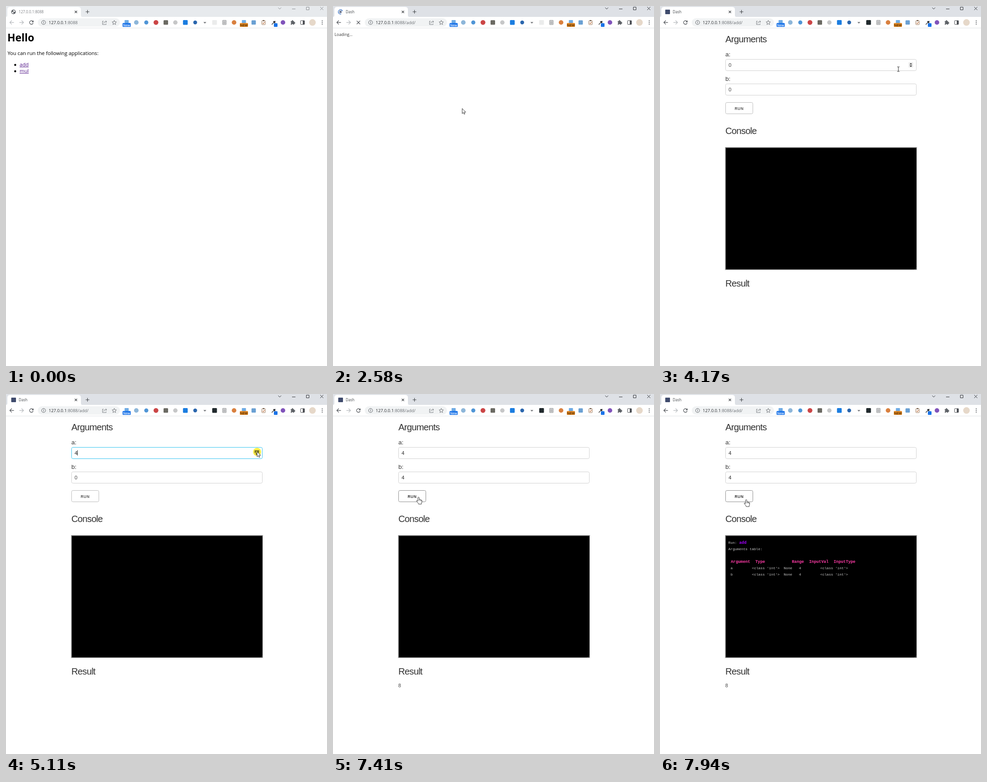
These frames come from a looping animation (707 px wide and 793 px high, 8 s). An HTML page with a canvas:

```html
<!DOCTYPE html>
<html lang="en">
<head>
<meta charset="utf-8">
<title>Dash form</title>
<style>
html, body { margin: 0; width: 100%; height: 100%; overflow: hidden; background: #fff; }
canvas { display: block; }
</style>
</head>
<body>
<canvas id="stage" width="707" height="793"></canvas>
<script>
const ctx = document.getElementById('stage').getContext('2d');
const LOOP = 8000;
const UI = '"Open Sans", "Noto Sans", sans-serif';
const ARIAL = '"Liberation Sans", Arial, sans-serif';
const MONO = '"Liberation Mono", monospace';

const T = {
  status: 980, click: 1150, wait: 1250, commit: 1990, loading: 2180, form: 2710,
  ready: 3700, console: 3640, focusB: 6040, run: 7200, result: 7410,
  updating: 7480, output: 7540, done: 7600
};
const clicksA = [4440, 4640, 4840, 5040];
const clicksB = [T.focusB, 6310, 6500, 6700];
const clicks = [T.click, ...clicksA, ...clicksB, T.run];

// time, x, y of the pointer hotspot
const path = [
  [40, 678, 800], [840, 49, 128.5], [1850, 49, 128.5], [2600, 285, 226],
  [2710, 285, 226], [3450, 190, 207], [3560, 190, 207], [4170, 525, 139],
  [4310, 553, 127], [5200, 553, 127], [5520, 554, 164], [5680, 554, 164],
  [5780, 557, 180], [6760, 557, 180], [6930, 300, 240], [7070, 188.5, 227],
  [7440, 188.5, 227], [7500, 189, 230.5], [7810, 189, 230.5], [7900, 190, 232.5]
];

const arrow = new Path2D('M0 0V11.2L2.6 8.8 4.3 12.6 6.1 11.8 4.4 8.1H7.9Z');
const hand = new Path2D('M-1.6 1.2Q0-1 1.4 1.2V5.4Q3 4.4 4 5.9 5.4 5.3 6 6.8 7.7 6.6 7.6 8.5' +
  'L7 12Q6.4 13 6.3 15.5H-.2Q-.5 13.5-2 12L-4.6 8.6Q-4.4 6.8-2.8 7.8L-1.6 9Z');

function text(str, x, y, size, color, family = UI, weight = 400, spacing = 0) {
  ctx.font = `${weight} ${size}px ${family}`;
  ctx.letterSpacing = spacing + 'px';
  ctx.fillStyle = color;
  ctx.fillText(str, x, y);
  return ctx.measureText(str).width;
}

function box(x, y, w, h, fill, r = 0, stroke) {
  ctx.beginPath();
  ctx.roundRect(x, y, w, h, r);
  if (fill) { ctx.fillStyle = fill; ctx.fill(); }
  if (stroke) { ctx.strokeStyle = stroke; ctx.lineWidth = 1; ctx.stroke(); }
}

function disc(x, y, r, fill) {
  ctx.beginPath();
  ctx.arc(x, y, r, 0, 7);
  ctx.fillStyle = fill;
  ctx.fill();
}

function line(d, color, width = 1) {
  ctx.strokeStyle = color;
  ctx.lineWidth = width;
  ctx.stroke(new Path2D(d));
}

function shape(d, fill) {
  ctx.fillStyle = fill;
  ctx.fill(new Path2D(d));
}

function cross(x, y, r, color, width) {
  line(`M${x - r} ${y - r}l${2 * r} ${2 * r}m0 ${-2 * r}l${-2 * r} ${2 * r}`, color, width);
}

function arc(x, y, r, from, to, color, width) {
  ctx.beginPath();
  ctx.arc(x, y, r, from, to);
  ctx.strokeStyle = color;
  ctx.lineWidth = width;
  ctx.stroke();
}

function pointerAt(t) {
  let i = 1;
  while (i < path.length - 1 && path[i][0] < t) i++;
  const [t0, x0, y0] = path[i - 1], [t1, x1, y1] = path[i];
  const k = Math.min(1, Math.max(0, (t - t0) / (t1 - t0)));
  const e = k * k * (3 - 2 * k);
  return { x: x0 + (x1 - x0) * e, y: y0 + (y1 - y0) * e };
}

const inside = (p, x, y, w, h) => p.x >= x && p.x <= x + w && p.y >= y && p.y <= y + h;
const pressed = (t, list) => list.some(c => t >= c && t < c + 130);
const count = (t, list) => list.filter(c => t >= c).length;

function drawTabIcon(t) {
  if (t >= T.wait && t < T.commit) {
    const a = -2 - (t - 1380) / 160;
    arc(16.5, 13, 4.8, a - 0.9, a + 0.6, '#c3c7cd', 1);
  } else if (t >= T.commit && t < T.ready) {
    const a = (t - 3500) / 170;
    box(14, 10.5, 5, 5, '#6d7891', 1);
    arc(16.5, 13, 4.8, a + 0.4, a + 5, '#2f6cc4', 1.4);
  } else if (t >= T.ready) {
    box(11.5, 8, 10.5, 10, '#3f4b6d', 1);
  } else {
    disc(16.5, 13, 5, '#5f6368');
    shape('M12.8 13h2.4l1.2 1.3v2.4q-3.4-.4-3.6-3.7ZM16.4 9.3q3 .1 3.8 2.5l-1.8 1.4-2.4-.6.2-1.5-1-.6Z', '#fff');
  }
}

function drawTabs(t) {
  const active = t >= T.click;
  const ink = active ? '#303236' : '#8b8e92';
  box(0, 0, 707, 24, active ? '#dee1e6' : '#e7eaed');
  shape('M0 24Q3 24 3 20V8Q3 2 9 2H159Q165 2 165 8V20Q165 24 168 24Z', '#fff');
  drawTabIcon(t);
  const busy = (t >= T.form && t < T.ready) || (t >= T.updating && t < T.done);
  const title = t < T.loading ? '127.0.0.1:8088' : busy ? 'Updating...' : 'Dash';
  text(title, 28, 16, 8.1, active ? '#45494d' : '#7c7f83');
  cross(154, 13, 2.5, '#3c4043', 1.1);
  line('M175.5 12.8h8m-4-4v8', '#3c4043', 1.1);
  line('M599.5 3.5l3.3 3.4 3.3-3.4', ink);
  line('M630 6.5h7.5', ink);
  line('M661.5 2.5h6v6h-6Z', ink);
  cross(695.5, 5.5, 3.4, ink);
}

function drawNav(t) {
  const dark = '#4b4f54', pale = '#b4b7bb';
  const loading = t >= T.wait && t < T.ready;
  line('M17.5 36.3h-9m4.2-4.3l-4.3 4.3 4.3 4.3', t >= T.commit ? dark : pale, 1.2);
  line('M29.5 36.3h9m-4.2-4.3l4.3 4.3-4.3 4.3', pale, 1.2);
  if (loading) cross(56, 36.3, 3.7, dark, 1.2);
  else {
    arc(56, 36.3, 4, 0.3, 5.5, dark, 1.3);
    shape('M60.6 31.5v4.2h-4.2Z', dark);
  }
  box(70, 27, 181, 18.5, '#f1f3f4', 9.2);
  arc(82.8, 36.3, 4.4, 0, 7, '#5f6368', 1);
  line('M82.8 35.6v3m0-5.1v1.2', '#5f6368', 1.1);
  const w = text('127.0.0.1', 94, 39.8, 9.45, '#2a2c30');
  text(t < T.commit ? ':8088' : ':8088/add/', 94 + w, 39.8, 9.45, '#6b6f74');
  line('M215 33.5h-2.5v7.3h8v-2M215 38.5q.4-4 4-4h2.6m-2.2-2.4l2.5 2.4-2.5 2.4', '#6f7378', 0.9);
  line('M238.5 31.6l1.4 3.2 3.4.3-2.6 2.3.8 3.4-3-1.8-3 1.8.8-3.4-2.6-2.3 3.4-.3Z', '#5f6368', 0.9);
}

function badge(x, label, bg, ink) {
  box(x - 4.5, 31, 9, 7, '#6fabe4', 1);
  box(x - 9, 37.5, 18, 8.5, bg, 1.5);
  ctx.textAlign = 'center';
  text(label, x, 44.6, 7.2, ink, UI, 600);
  ctx.textAlign = 'left';
}

function drawExtensions(t) {
  const square = (x, color, r = 5) => box(x - r, 36.3 - r, 2 * r, 2 * r, color, 1.5);
  const round = (x, color, r = 5.3) => disc(x, 36.3, r, color);
  badge(265.7, 'New', '#1a73e8', '#fff');
  round(287, '#8db6d9', 5);
  round(309, '#4f95d6', 4.5);
  round(330.3, '#cb4546');
  square(352, '#6b6a63');
  round(373, '#c6c7c8', 4.8);
  square(395, '#1b7de0', 5.2);
  round(416.7, '#2a66ad', 4.2);
  shape('M434.8 35.3h6.4l-3.2 3.4Z', '#74777b');
  square(459.4, t < T.form + 60 ? '#ebecec' : '#20292c', 5.2);
  box(477, 31.5, 8, 9.5, '#d3d4d5', 0.5, '#97999b');
  line('M478.5 34.5h5m-5 2h5m-5 2h5', '#97999b', 0.8);
  round(502.3, '#d9803f', 5);
  badge(524, 'NEW', '#df8420', '#4a2b05');
  square(545.5, '#6aa0d3', 4.8);
  box(563.5, 32.5, 7.5, 8.5, '#fff', 0.8, '#9a7453');
  box(565.5, 31, 3.5, 2.4, '#6f5a48');
  line('M565.2 37l1.6 1.8 2.8-3.4', '#c06a35', 1.1);
  line('M585.3 41l5-5.2', '#3a3d42', 1.4);
  line('M589 33.6l3.8 3.8m-1.8-1.8l2-2.4', '#25272b', 2.2);
  box(590, 38, 8, 8, '#1a73e8', 1.2);
  round(610, '#8053ba', 5);
  box(627, 33.4, 8, 7.6, '#5f6368', 1);
  disc(631, 33, 1.8, '#5f6368');
  disc(635.3, 37.2, 1.7, '#5f6368');
  disc(627, 37.4, 1.3, '#fff');
  disc(631, 41, 1.3, '#fff');
  box(648.7, 32.2, 8.6, 8.4, null, 1, '#46494e');
  box(653.7, 32, 3.8, 8.8, '#46494e');
  disc(675, 36.3, 7.2, '#e6d8c9');
  for (const y of [32.7, 36.4, 40.1]) disc(696.5, y, 1.1, '#5f6368');
}

function drawIndex(t) {
  text('Hello', 3, 77.8, 22.9, '#000', UI, 700);
  text('You can run the following applications:', 3.4, 108.2, 11.16, '#000');
  [['add', 133], ['mul', 147]].forEach(([name, y]) => {
    disc(20.3, y - 3.3, 2.2, '#000');
    const w = text(name, 30, y, 11.16, '#551a8b');
    box(30, y + 1, w, 0.9, '#551a8b');
  });
  if (t >= T.status) {
    ctx.globalAlpha = Math.min(1, (t - T.status) / 140);
    box(-4, 783.5, 84, 14, '#dee1e6', 3);
    text('127.0.0.1:8088/add', 1, 794, 8.3, '#5f6368');
    ctx.globalAlpha = 1;
  }
}

function drawInput(t, y, list, focused, p) {
  box(144.5, y + 0.5, 420, 25, '#fff', 3, focused ? '#33c3f0' : '#d1d1d1');
  const n = count(t, list);
  text(String(n), 151, y + 17, 11.2, n ? '#222' : '#444', ARIAL);
  if (focused) {
    const last = list[n - 1];
    if ((t - last) % 1060 < 530) box(157, y + 7, 1, 11.5, '#222');
  }
  if (inside(p, 144, y, 421, 26)) {
    const down = pressed(t, list);
    box(547.5, y + 7, 10, 11.5, '#ececec');
    if (down) box(547.5, y + 7, 10, 5.7, '#777');
    shape(`M549.7 ${y + 11.8}h5.6l-2.8-3.4Z`, down ? '#eee' : '#444');
    shape(`M549.7 ${y + 14}h5.6l-2.8 3.4Z`, '#444');
  }
}

function drawOutput() {
  const put = (s, x, y) => text(s, x, y, 7.83, '#c9c9c9', MONO);
  const head = (s, x, y, color) => text(s, x, y, 8.9, color, MONO, 700);
  put('Run:', 150.5, 329.5);
  head('add', 174.5, 329.5, '#a400ff');
  put('Arguments table:', 150.5, 343.7);
  [['Argument', 156], ['Type', 210], ['Range', 290.5], ['InputVal', 328.5], ['InputType', 382.5]]
    .forEach(([s, x]) => head(s, x, 372, '#ff3ba7'));
  ['a', 'b'].forEach((name, i) => {
    const y = 386.3 + i * 14.1;
    put(name, 155.5, y);
    put("<class 'int'>", 202.5, y);
    put('None', 272.5, y);
    put('4', 306, y);
    put("<class 'int'>", 353, y);
  });
}

function drawConsole(t) {
  const black = t >= T.console;
  const w = black ? 423 : 424, h = black ? 271 : 272;
  box(143.5, 311, w, h, '#e6e6e6');
  shape(`M143.5 ${311 + h}V311h${w}l-1.5 1.5H145V${309.5 + h}Z`, '#858585');
  box(145, 312.5, w - 3, h - 3, black ? '#000' : '#fff');
  line('M560.5 581l5.5-5.5m-2.5 5.5l2.5-2.5', '#8a8a8a', 0.8);
  if (t >= T.output) drawOutput();
}

function drawForm(t, p) {
  const title = (s, y) => text(s, 144, y, 20.2, '#323232', ARIAL, 400, -0.75);
  title('Arguments', 79.5);
  text('a:', 144, 111, 13.4, '#323232', ARIAL);
  drawInput(t, 117, clicksA, t >= clicksA[0] && t < T.focusB, p);
  text('b:', 144, 164.7, 13.4, '#323232', ARIAL);
  drawInput(t, 171, clicksB, t >= T.focusB && t < T.run, p);
  const hot = inside(p, 144, 212, 61, 26) || t >= T.run;
  box(144.5, 212.5, 60, 25, '#fff', 3, hot ? '#8c8c8c' : '#bbb');
  text('RUN', 164.4, 228.8, 8.25, hot ? '#333' : '#555', ARIAL, 700, 0.75);
  title('Console', 282);
  drawConsole(t);
  title('Result', 618);
  if (t >= T.result) text('8', 143.7, 646, 10.8, '#444', ARIAL);
}

function drawPointer(t, p) {
  if (pressed(t, clicks)) {
    ctx.globalCompositeOperation = 'multiply';
    disc(p.x, p.y + 0.5, 9, '#fff04a');
    ctx.globalCompositeOperation = 'source-over';
  }
  const form = t >= T.form;
  const onLink = form ? inside(p, 144, 212, 61, 26) : t < T.commit && inside(p, 30, 122, 20, 26);
  const onField = form && (inside(p, 145, 117, 400, 26) || inside(p, 145, 171, 400, 26));
  ctx.save();
  ctx.translate(p.x, p.y);
  if (onField) {
    line('M-2.5-5h2l.5.6.5-.6h2M0-4.5V4.8M-2.5 5.2h2l.5-.6.5.6h2', '#222');
  } else {
    const icon = onLink ? hand : arrow;
    ctx.lineJoin = 'round';
    ctx.fillStyle = '#fff';
    ctx.fill(icon);
    ctx.strokeStyle = '#222';
    ctx.lineWidth = 0.9;
    ctx.stroke(icon);
    if (onLink) line('M1.4 5.4v3M4 6v2.6M6 7v2', '#222', 0.7);
  }
  ctx.restore();
}

function draw(t) {
  const p = pointerAt(t);
  box(0, 0, 707, 793, '#fff');
  drawTabs(t);
  drawNav(t);
  drawExtensions(t);
  box(0, 48, 707, 1, '#e1e3e6');
  if (t < T.commit) drawIndex(t);
  else if (t >= T.form) drawForm(t, p);
  else if (t >= T.loading) text('Loading...', 3.5, 66, 8.8, '#333');
  if (t >= 70) drawPointer(t, p);
}

const start = performance.now();
function tick() {
  draw((performance.now() - start) % LOOP);
  requestAnimationFrame(tick);
}
tick();
</script>
</body>
</html>
```
